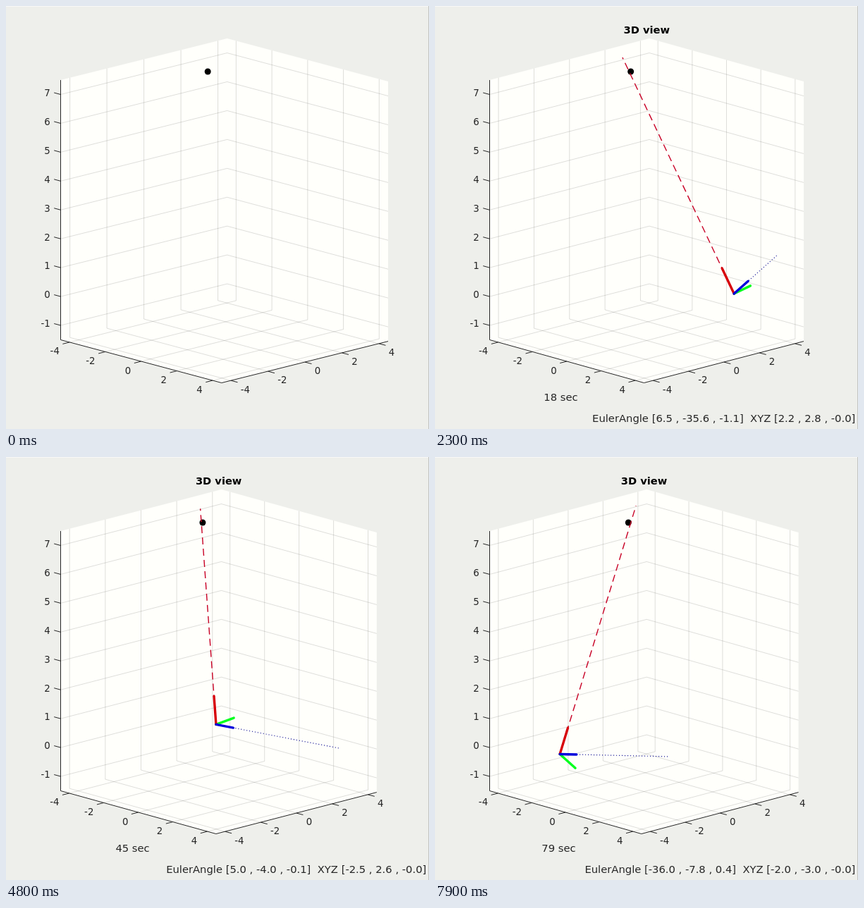
An HTML page that plays this animation: 600x600 px, repeating every 8000 ms.

```html
<!DOCTYPE html>
<html lang="en">
<head>
<meta charset="utf-8">
<title>3D view</title>
<style>
  html, body { margin: 0; width: 100%; height: 100%; overflow: hidden; background: #eeefeb; }
  svg { display: block; width: 600px; height: 600px; }
  text { font-family: "DejaVu Sans", sans-serif; font-size: 13.33px; fill: #262626; }
  .label { font-size: 14.75px; }
  .title { font-size: 14.67px; font-weight: bold; fill: #000; }
  path { fill: none; }
  .wall { fill: #fffffb; }
  .grid { stroke: #262626; stroke-opacity: .15; }
  .axis { stroke: #262626; }
  .beam { stroke: #c80024; stroke-width: 1.4; stroke-dasharray: 10 6; }
  .trace { stroke: #00008c; stroke-width: 1.2; stroke-dasharray: 1 3; }
  .arm { stroke-width: 3.4; stroke-linecap: round; }
</style>
</head>
<body>
<svg id="stage" viewBox="0 0 600 600"></svg>
<script>
const stage = document.getElementById('stage');
const pen = document.createElement('canvas').getContext('2d');
pen.font = '14.75px "DejaVu Sans", sans-serif';

const LOOP = 8000, LEFT = 77.5, LIM = 4.5;
const STEPS = [-4, -2, 0, 2, 4];
const HOLDS = new Set([25, 34, 40, 44, 49, 55, 75]);

// Pose keys, by simulated second
const CLOCK = [800, 1600, 3000, 4200, 5600, 6700, 7900];
const SEC = [1, 9, 26, 39, 53, 66, 79];
const ROLL = [-11, -1.4, 11.4, 10.5, -5.1, -23.9, -36];
const PITCH = [-43, -41.7, -28.5, -11.1, 3.2, 4, -7.8];
const YAW = [-3, -2.4, .1, -.03, -.2, .2, .4];
const LEAD = [-1.6, -1.6, 1.8, 1.8, 1.7, 1.8, 1.7];
const END_X = [185, 186.5, 187.7, 192, 200.3, 207, 209.5];
const END_Y = [68, 69, 76, 74, 72.5, 71, 69];
const BEAM = [10.4, 10, 8.65, 7.8, 7.6, 8.45, 9.5];
const TRACE = [1.1, 1.7, 4.35, 6.41, 7.85, 7.8, 6.49];

const rad = d => d * Math.PI / 180;

function segment(xs, x) {
  let i = 0;
  while (i < xs.length - 2 && x >= xs[i + 1]) i++;
  return i;
}

function lerp(xs, ys, x) {
  const i = segment(xs, x);
  return ys[i] + (ys[i + 1] - ys[i]) * (x - xs[i]) / (xs[i + 1] - xs[i]);
}

function spline(ys, x) {
  const i = segment(SEC, x), h = SEC[i + 1] - SEC[i], u = (x - SEC[i]) / h;
  const slope = k => {
    const a = Math.max(k - 1, 0), b = Math.min(k + 1, SEC.length - 1);
    return (ys[b] - ys[a]) / (SEC[b] - SEC[a]);
  };
  const v = u * u * (3 - 2 * u);
  return ys[i] * (1 - v) + ys[i + 1] * v
    + h * u * (1 - u) * (slope(i) * (1 - u) - slope(i + 1) * u);
}

function secondAt(tick) {
  if (tick < 8) return 0;
  if (HOLDS.has(tick)) tick--;
  return Math.round(lerp(CLOCK, SEC, tick * 100));
}

const fmt = list => '[' + list.map(v => v.toFixed(1)).join(' , ') + ']';

function readout(t) {
  const q = rad(3.02 * t - 2);
  return 'EulerAngle ' + fmt([spline(ROLL, t), spline(PITCH, t), lerp(SEC, YAW, t)])
    + '\u00a0 XYZ ' + fmt([3.57 * Math.cos(q), 3.57 * Math.sin(q), -.01]);
}

const line = (cls, ...pts) =>
  `<path class="${cls}" d="M${pts.map(p => p.map(n => n.toFixed(2)).join()).join('L')}"/>`;
const arm = (color, p, q) => line('arm" stroke="' + color, p, q);
const text = (s, x, y, anchor, cls = '') =>
  `<text class="${cls}" x="${x.toFixed(2)}" y="${y.toFixed(2)}" text-anchor="${anchor}">${s}</text>`;
const shift = (p, v, k = 1) => [p[0] + v[0] * k, p[1] + v[1] * k];

function draw(t) {
  const info = t ? readout(t) : '';
  const right = t ? 519.3 - .7 * (pen.measureText(info).width - 378.5) : 542;
  const w = right - LEFT, s = w / 442;
  const P = (a, b, z) => [
    LEFT + w * (.4915 * (a + LIM) + .5085 * (b + LIM)) / 9,
    473.5 + 6.78 * (a + LIM) - 6.55 * (b + LIM) - 40.94 * (z + 1.5)
  ];
  const lo = -1.5, hi = 7.5;
  const west = P(-LIM, -LIM, lo), south = P(LIM, -LIM, lo), east = P(LIM, LIM, lo);

  let out = '<rect width="600" height="600" fill="#eeefeb"/>'
    + '<rect width="600" height="1" fill="#f8f8f6"/>'
    + '<rect x="599" width="1" height="600" fill="#c4c5c2"/>'
    + line('wall', west, south, east, P(LIM, LIM, hi), P(-LIM, LIM, hi), P(-LIM, -LIM, hi));

  for (const v of STEPS) {
    out += line('grid', P(v, -LIM, lo), P(v, LIM, lo), P(v, LIM, hi));
    out += line('grid', P(LIM, v, lo), P(-LIM, v, lo), P(-LIM, v, hi));
  }
  for (let z = -1; z <= 7; z++)
    out += line('grid', P(-LIM, -LIM, z), P(-LIM, LIM, z), P(LIM, LIM, z));

  out += line('axis', P(-LIM, -LIM, hi), west, south, east);
  for (const v of STEPS) {
    const a = P(v, -LIM, lo), b = P(LIM, v, lo);
    out += line('axis', a, shift(a, [-9.8, 2.5])) + line('axis', b, shift(b, [9.6, 2.5]));
    out += text(v, a[0] - 14.3, a[1] + 17.5, 'end') + text(v, b[0] + 13.8, b[1] + 17.3, 'start');
  }
  for (let z = -1; z <= 7; z++) {
    const p = P(-LIM, -LIM, z);
    out += line('axis', p, shift(p, [-9.3, -2.5])) + text(z, 62.7, p[1] + 2.3, 'end');
  }

  out += `<circle cx="${LEFT + .4493 * w}" cy="93" r="4.5"/>`;
  if (t || tickNow >= 6) out += body(t, P, s);

  if (t) {
    out += text('3D view', (LEFT + right) / 2, 39, 'middle', 'title')
      + text(t + ' sec', 201 + .4 * (right - 519), 560, 'end', 'label')
      + text(info, 596.3, 590, 'end', 'label');
  }
  stage.innerHTML = out;
}

function body(t, P, s) {
  let pos = [3.5, 0, 0], r = 0, p = 0, beam = 7.5, trace = 1;
  if (t) {
    const q = rad(3.02 * t + lerp(SEC, LEAD, t));
    pos = [3.58 * Math.cos(q), 3.58 * Math.sin(q), 0];
    // the drawn pose runs one second ahead of the readout
    r = rad(spline(ROLL, t + 1));
    p = rad(spline(PITCH, t + 1));
    beam = spline(BEAM, t);
    trace = spline(TRACE, t);
  }
  const o = P(...pos);
  const dir = (a, b, z) => {
    const e = P(pos[0] + a, pos[1] + b, pos[2] + z);
    return [e[0] - o[0], e[1] - o[1]];
  };
  const blue = dir(Math.cos(p), 0, -Math.sin(p));
  const green = dir(Math.sin(r) * Math.sin(p), Math.cos(r), Math.sin(r) * Math.cos(p));
  const end = t ? [LEFT + spline(END_X, t) * s, spline(END_Y, t)] : P(3.5, 0, 7.5);
  const red = [(end[0] - o[0]) / beam, (end[1] - o[1]) / beam];

  return line('beam', o, end)
    + line('trace', o, shift(o, blue, trace))
    + arm('#00ff1e', o, shift(o, green))
    + arm('#d7000a', o, shift(o, red))
    + arm('#0000dc', o, shift(o, blue));
}

let tickNow = -1;
function frame() {
  const tick = Math.floor(performance.now() % LOOP / 100);
  if (tick !== tickNow) {
    tickNow = tick;
    draw(secondAt(tick));
  }
  requestAnimationFrame(frame);
}
frame();
</script>
</body>
</html>
```
